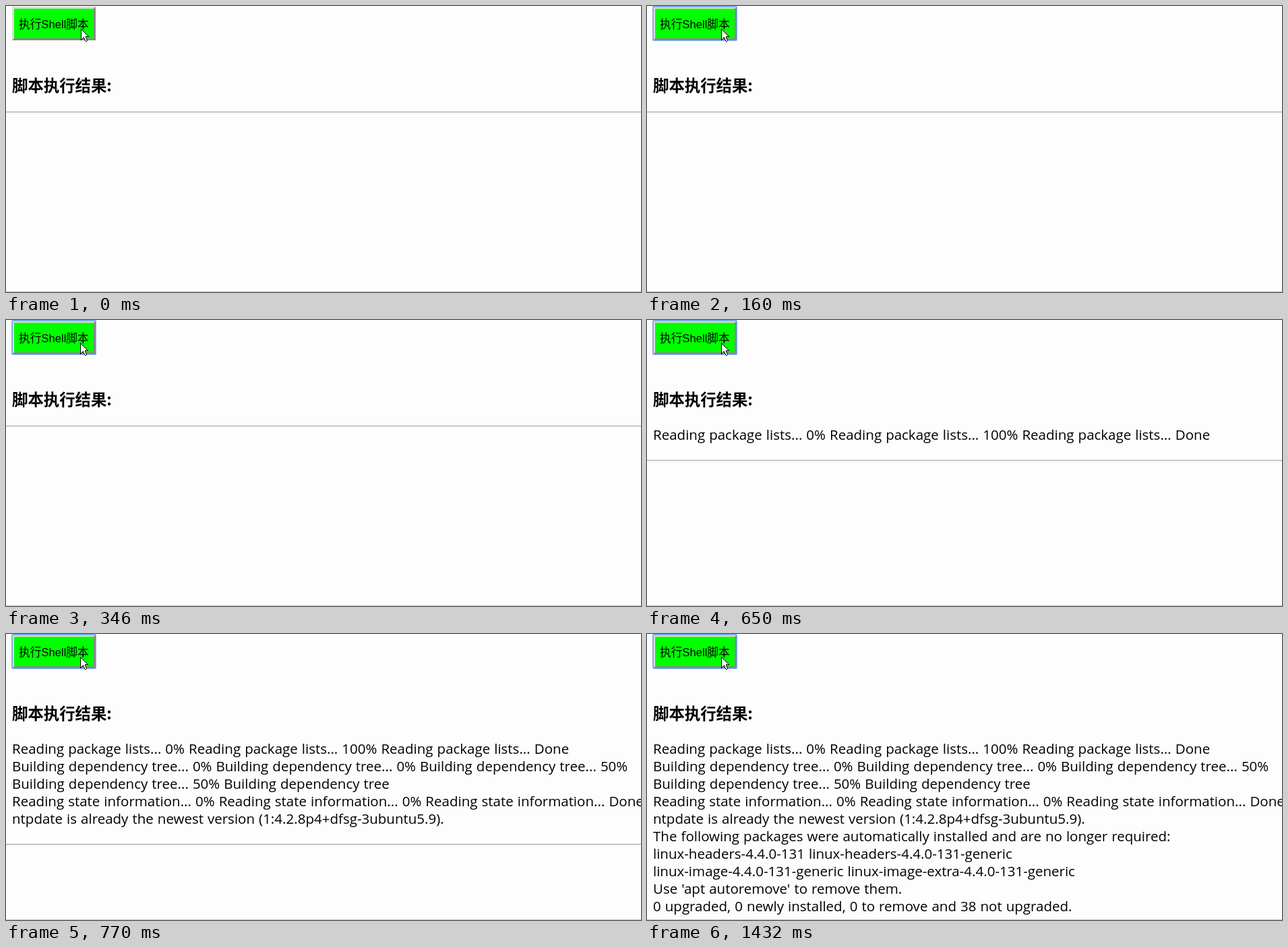
These frames come from a looping animation (942x425 px, 1.72 s). An HTML page:

```html
<!DOCTYPE html>
<html lang="zh">
<head>
<meta charset="utf-8">
<title>执行Shell脚本</title>
<style>
  html, body { margin: 0; width: 100%; height: 100%; overflow: hidden; background: #fdfdfd; }
  svg { display: block; }
  .label { font: 16.67px "Liberation Sans", "Noto Sans CJK SC", "Noto Sans CJK", sans-serif; }
  .title { font: bold 23.4px "Noto Sans CJK SC", "Noto Sans CJK", sans-serif; }
  .log text { font: 20.5px "Open Sans", "Noto Sans", sans-serif; word-spacing: .7px; }
</style>
</head>
<body>
<svg width="942" height="425" viewBox="0 0 942 425">
  <defs>
    <path id="arrow" d="M1 1.5L10.5 11H7V14H8V16H9V18H7V16H6V14H5V12H4V13H3V14H2V15H1Z"/>
  </defs>
  <rect width="942" height="425" fill="#fdfdfd"/>

  <path fill="#ddd" d="M9 1H133L130 4H12V48L9 51Z"/>
  <path fill="#888" d="M133 51H9L12 48H130V4L133 1Z"/>
  <g id="pressed">
    <path fill="#888" d="M9 1H133L130 4H12V48L9 51Z"/>
    <path fill="#ddd" d="M133 51H9L12 48H130V4L133 1Z"/>
  </g>
  <rect x="12" y="4" width="118" height="44" fill="#0f0"/>
  <rect id="ring" x="9" y="1" width="124" height="50" rx="1" fill="none"
        stroke="#5f94f2" stroke-opacity=".75" stroke-width="2"/>
  <text class="label" x="19" y="33">执行Shell脚本</text>

  <circle id="glow" cx="110" cy="35" r="16" fill="#ff0" fill-opacity=".5"/>
  <g id="cursor" shape-rendering="crispEdges">
    <path d="M0 0H.5L11.5 11 12 12H8V14H9V16H10V18H9V19H7V18H6V16H5V14H3V15H2V16H1V17H0Z"/>
    <use href="#arrow" fill="#fff"/>
    <use id="tint" href="#arrow" fill="#ff0" fill-opacity=".4"/>
  </g>

  <text class="title" x="9" y="127">脚本执行结果:</text>
  <g class="log" id="log"></g>
  <g id="rule">
    <rect width="942" height="1" fill="#9a9a9a"/>
    <rect y="2" width="942" height="1" fill="#eee"/>
  </g>
  <rect y="424" width="942" height="1" fill="#c6c6c6"/>
</svg>

<script>
const LOOP = 1720, PRESS = 70, RELEASE = 160;
const LINE = 26, BASE = 178;

// Each batch of output and the time it arrives.
const batches = [
  [470, ['Reading package lists... 0% Reading package lists... 100% Reading package lists... Done']],
  [770, [
    'Building dependency tree... 0% Building dependency tree... 0% Building dependency tree... 50%',
    'Building dependency tree... 50% Building dependency tree',
    'Reading state information... 0% Reading state information... 0% Reading state information... Done',
    'ntpdate is already the newest version (1:4.2.8p4+dfsg-3ubuntu5.9).'
  ]],
  [1000, [
    'The following packages were automatically installed and are no longer required:',
    'linux-headers-4.4.0-131 linux-headers-4.4.0-131-generic',
    'linux-image-4.4.0-131-generic linux-image-extra-4.4.0-131-generic',
    "Use 'apt autoremove' to remove them.",
    '0 upgraded, 0 newly installed, 0 to remove and 38 not upgraded.'
  ]]
];

const $ = id => document.getElementById(id);
const animations = [];

// Holds each value from its time until the next one.
function steps(el, prop, table) {
  const frames = table.map(([t, v]) => ({ offset: t / LOOP, [prop]: v, easing: 'step-end' }));
  frames.push({ offset: 1, [prop]: table[table.length - 1][1] });
  animations.push(el.animate(frames, { duration: LOOP, iterations: Infinity }));
}

const showFrom = (el, t) => steps(el, 'opacity', [[0, 0], [t, 1]]);
const showBetween = (el, a, b) => steps(el, 'opacity', [[0, 0], [a, 1], [b, 0]]);
const move = (x, y) => `translate(${x}px, ${y}px)`;

const ruleTable = [[0, move(0, 157)]];
let count = 0;
for (const [time, lines] of batches) {
  const group = document.createElementNS('http://www.w3.org/2000/svg', 'g');
  for (const line of lines) {
    const text = document.createElementNS('http://www.w3.org/2000/svg', 'text');
    text.setAttribute('x', 9);
    text.setAttribute('y', BASE + LINE * count++);
    text.textContent = line;
    group.append(text);
  }
  $('log').append(group);
  showFrom(group, time);
  ruleTable.push([time, move(0, 182 + LINE * count)]);
}

steps($('rule'), 'transform', ruleTable);
steps($('cursor'), 'transform', [[0, move(111, 34)], [PRESS, move(110, 34)]]);
showFrom($('ring'), PRESS);
for (const id of ['pressed', 'glow', 'tint']) showBetween($(id), PRESS, RELEASE);

const start = document.timeline.currentTime;
for (const a of animations) a.startTime = start;
</script>
</body>
</html>
```
